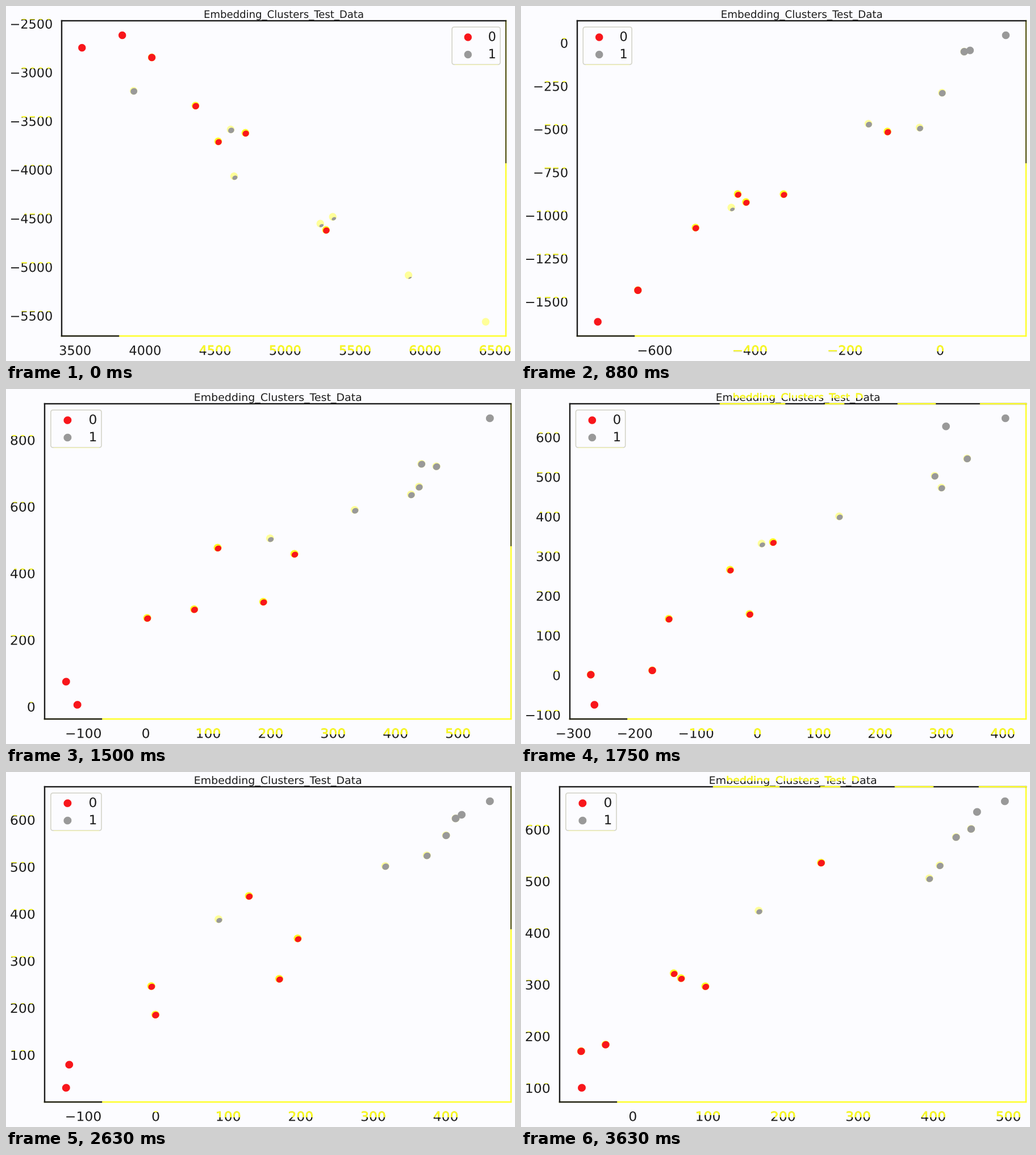
Animation, 896 px wide and 625 px high, one loop 3760 ms. Source, as a matplotlib script:

```python
import numpy as np
import matplotlib.pyplot as plt
from matplotlib.animation import FuncAnimation
from matplotlib.patches import Ellipse, FancyBboxPatch, PathPatch, Rectangle
from matplotlib.textpath import TextPath
from matplotlib.ticker import MaxNLocator
from matplotlib.transforms import Affine2D

W, H = 896, 625
EPOCHS, LOOP = 30, 3760
TOP, BOTTOM = 26.3, 581.2

# Plot layout in inches; each plot is squeezed to the stage width
AXES_W, AXES_H = 9.0675, 6.368
MARGIN, GAP = 0.0765, 0.1845
TICK_EM, TITLE_EM = 18.7 / 72, 15.1 / 72
VSCALE = (BOTTOM - TOP) / AXES_H

PAPER, INK, YELLOW, PALE = "#fcfcff", "#1b1b1b", "#ffff24", "#ffff99"
RED, GRAY = "#f8161b", "#999999"

plt.rcParams["font.family"] = "DejaVu Sans"
fig = plt.figure(figsize=(W / 100, H / 100), dpi=100, facecolor=PAPER)
ax = fig.add_axes([0, 0, 1, 1])
locator = MaxNLocator(nbins=9, steps=[1, 2, 2.5, 5, 10])

keys = {}


def key(epoch, xspan, yspan, glow, red, gray):
    """Store one scatter: points in plot units, stretched to the given spans."""
    pts = np.array(red + gray, float)
    pts[:, 1] *= -1
    low, high = pts.min(axis=0), pts.max(axis=0)
    lo, hi = np.transpose([xspan, yspan])
    keys[epoch] = (lo + (pts - low) / (high - low) * (hi - lo), glow)


key(0, (3549, 6433), (-5561, -2617), False,
    [(133, 73), (204, 51), (256, 90), (333, 175), (373, 238), (421, 223), (563, 394)],
    [(224, 149), (395, 217), (401, 299.5), (553, 383), (575, 371), (708.5, 474), (844.5, 556)])
key(3, (-1605, -511), (-3920, -1155), True,
    [(134, 556), (242, 462), (322, 392), (371, 303), (392, 375), (431, 310), (717, 186)],
    [(257, 391), (576, 207), (690.5, 221), (751, 147), (820.5, 52), (823, 56), (853, 59)])
key(10, (-55.7, 624.6), (46.2, 974.5), False,
    [(119, 520), (145, 556), (275, 367), (382, 381), (389, 264), (490, 366), (550, 298)],
    [(497, 259), (648, 208), (710, 198), (724.5, 171), (727, 157), (747, 141), (852, 51)])
key(14, (-343.8, 330.9), (-114.4, 577.4), True,
    [(122.5, 498), (122.5, 556), (215, 556), (218, 423), (360, 355), (372, 418), (407, 272)],
    [(398, 293), (530, 249), (734, 154), (745, 195), (755, 51), (798, 137), (853, 78.5)])
key(21, (-87, 482.6), (41.5, 656.6), False,
    [(104.5, 556), (111, 498), (264, 338), (272, 421), (439, 192), (500, 349), (531.5, 294)],
    [(368, 251), (690, 151), (736, 147), (774, 98.5), (792, 91), (796, 67.5), (844, 51)])
key(25, (-65.5, 503.8), (66.2, 663.4), True,
    [(105.5, 556), (109, 432), (229, 343), (268, 336.5), (280, 345), (450, 185), (754, 63)],
    [(552.5, 192), (687, 153.5), (729, 187), (739, 147), (764, 126), (803, 68.5), (852, 52)])
key(29, (-70, 492.5), (63.2, 652.5), True,
    [(105.5, 433), (106, 556), (121.5, 490.5), (269, 335), (282, 343), (282, 415), (452, 183)],
    [(373, 245.5), (729.5, 187), (740, 147), (775, 98), (802, 87), (803, 69), (852, 51)])


def scatter_at(epoch):
    """Points for one epoch, blended between the stored scatters."""
    steps = sorted(keys)
    j = min(np.searchsorted(steps, epoch, "right"), len(steps) - 1)
    a, b = steps[j - 1], steps[j]
    t = (epoch - a) / (b - a)
    pts = (1 - t) * keys[a][0] + t * keys[b][0]
    return pts, keys[a if t < 0.5 else b][1]


def limits(values):
    pad = 0.05 * np.ptp(values)
    return values.min() - pad, values.max() + pad


def ticks(lo, hi):
    return [round(v) for v in locator.tick_values(lo, hi) if lo <= v <= hi]


def label(value):
    return str(value).replace("-", "\u2212")


def advance(text):
    return TICK_EM * sum(0.838 if c == "\u2212" else 0.636 for c in text)


def line(xs, ys, color, width=2.4):
    ax.plot(xs, ys, color=color, lw=width * 0.72, solid_capstyle="projecting")


def write(text, x, base, em, u, align=0.0, tint=0.0, part=(0, 1)):
    """Draw text; the top share `tint` turns yellow across `part` of its width."""
    path = TextPath((0, 0), text, size=em)
    box = path.get_extents()
    width = box.x0 + box.x1 if em == TITLE_EM else advance(text)
    place = Affine2D().scale(u, -VSCALE).translate(x - align * width * u, base)
    path = path.transformed(place)
    ax.add_patch(PathPatch(path, fc=INK, lw=0))
    if tint:
        box = path.get_extents()
        over = PathPatch(path, fc=YELLOW, ec=YELLOW, lw=0.5)
        ax.add_patch(over)
        over.set_clip_path(Rectangle(
            (box.x0 + part[0] * box.width - 1, box.y0 - 1),
            (part[1] - part[0]) * box.width + 2, tint * box.height + 1,
            transform=ax.transData))


def dot(x, y, color, u, fade=0.0):
    """A marker whose upper left fades to yellow."""
    rx, ry = 0.0775 * u, 0.0775 * VSCALE
    if fade > 0.02:
        ax.add_patch(Ellipse((x, y), 2 * rx, 2 * ry, lw=0,
                             fc=YELLOW if color == RED else PALE))
    if fade < 1:
        ax.add_patch(Ellipse((x + 0.4 * fade * rx, y + 0.7 * fade * ry),
                             2 * rx * (1 - 0.55 * fade), 2 * ry * (1 - 0.85 * fade),
                             angle=-25, fc=color, lw=0))


def fade_of(color, y):
    if color == RED:
        return max(0, 0.3 * np.sin(np.pi * (y - 70) / 450))
    return np.clip((y - 70) / 420, 0, 1)


def frame_box(left, right, glow):
    width = right - left
    line([right, right], [TOP, BOTTOM], YELLOW)
    if not glow:
        line([right, right], [TOP, TOP + 250], INK, 1.6)
    line([left, right], [BOTTOM, BOTTOM], YELLOW)
    line([left, left + 100], [BOTTOM, BOTTOM], INK)
    line([left, right], [TOP, TOP], INK)
    if glow:
        for a, b in [(0.33, 0.47), (0.56, 0.6), (0.72, 0.8), (0.9, 1)]:
            line([left + a * width, left + b * width], [TOP, TOP], YELLOW)
    line([left, left], [TOP, BOTTOM], INK)


def legend(x, u):
    ax.add_patch(FancyBboxPatch((x + 4, 41), 0.985 * u - 8, 58, fc=PAPER,
                                boxstyle="round,pad=4,rounding_size=4",
                                ec="#d2d2c6", lw=1.1))
    line([x + 5, x + 0.985 * u - 5], [103, 103], "#f4f4b4", 1.3)
    for text, color, y in [("0", RED, 55), ("1", GRAY, 85.5)]:
        dot(x + 0.326 * u, y, color, u)
        write(text, x + 0.736 * u, y + 6.6, TICK_EM, u)


def draw(epoch):
    ax.clear()
    ax.set(xlim=(0, W), ylim=(H, 0))
    ax.axis("off")
    pts, glow = scatter_at(epoch)
    (x0, x1), (y0, y1) = limits(pts[:, 0]), limits(pts[:, 1])
    xticks, yticks = ticks(x0, x1), ticks(y0, y1)

    # Fit labels, axes and any overhanging last label into the stage width
    side = max(advance(label(v)) for v in yticks)
    end = (xticks[-1] - x0) / (x1 - x0) * AXES_W + advance(label(xticks[-1])) / 2
    u = W / (2 * MARGIN + side + GAP + AXES_W + max(0, end - AXES_W))
    left = (MARGIN + side + GAP) * u
    right = left + AXES_W * u

    def to_x(v):
        return left + (v - x0) / (x1 - x0) * (right - left)

    def to_y(v):
        return BOTTOM - (v - y0) / (y1 - y0) * (BOTTOM - TOP)

    for i, (px, py) in enumerate(zip(to_x(pts[:, 0]), to_y(pts[:, 1]))):
        color = RED if i < 7 else GRAY
        dot(px, py, color, u, fade_of(color, py))

    frame_box(left, right, glow)
    for v in xticks:
        x = to_x(v)
        write(label(v), x, 614.3, TICK_EM, u, 0.5, np.clip((x - 250) / 200, 0, 0.62))
    for v in yticks:
        write(label(v), left - GAP * u, to_y(v) + 8.2, TICK_EM, u, 1, 0.08)
    write("Embedding_Clusters_Test_Data", (left + right) / 2, 21, TITLE_EM, u, 0.5,
          0.5 if glow else 0, (0.1, 0.9))

    # The legend takes the right corner only when it is free
    px, py = to_x(pts[:, 0]), to_y(pts[:, 1])
    busy = np.any((px > right - 1.1 * u) & (py < 103))
    legend(left + 0.115 * u if busy else right - 1.1 * u, u)


anim = FuncAnimation(fig, draw, frames=EPOCHS, interval=LOOP / EPOCHS, repeat=True)
plt.show()
```
